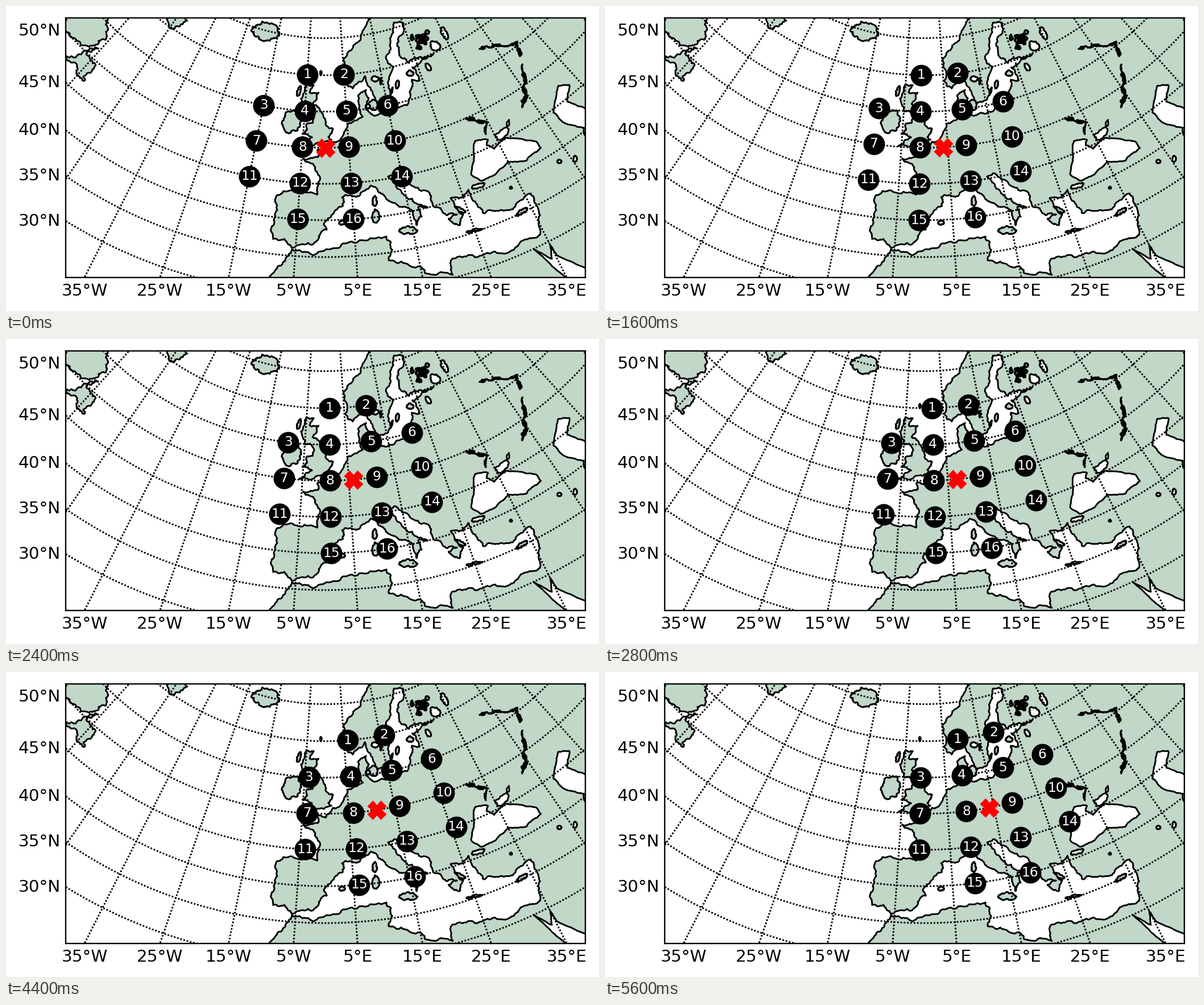
Animation, 1043 px wide and 537 px high, one loop 6 s. Source, as a matplotlib script:

```python
import numpy as np
import matplotlib.pyplot as plt
from matplotlib.animation import FuncAnimation

W, H, DPI = 1043, 537, 128
X0, X1, Y0, Y1 = 105.3, 1018.9, 21.1, 477.9
CX, CY = (X0 + X1) / 2, (Y0 + Y1) / 2
PX = 72 / DPI          # points per pixel
U = 2.917 * PX         # line unit
LAND = "#c1d7c8"
rng = np.random.default_rng(4)

# Lambert conformal conic, tangent at 50N, 8000 km wide
N = np.sin(np.radians(50))
RHO0 = (X1 - X0) / 8e6 * 6370997 / np.tan(np.radians(50))


def project(lon, lat):
    half = np.radians(45 + np.asarray(lat, float) / 2)
    rho = RHO0 * (np.tan(np.radians(70)) / np.tan(half)) ** N
    a = N * np.radians(lon)
    return CX + rho * np.sin(a), CY - RHO0 + rho * np.cos(a)


fig = plt.figure(figsize=(W / DPI, H / DPI), dpi=DPI, facecolor="white")
ax = fig.add_axes([X0 / W, 1 - Y1 / H, (X1 - X0) / W, (Y1 - Y0) / H])
ax.set(xlim=(X0, X1), ylim=(Y1, Y0), xticks=[], yticks=[])
for spine in ax.spines.values():
    spine.set_linewidth(0.8 * U)


def roughen(pts, amount, levels=4):
    """Fractal coast: push the midpoint of every side at random, repeatedly."""
    for _ in range(levels):
        step = np.roll(pts, -1, axis=0) - pts
        size = np.maximum(np.hypot(*step.T), 1e-6)
        push = rng.uniform(-amount, amount, len(pts)) * np.minimum(1, 18 / size)
        mid = pts + step / 2 + step[:, ::-1] * [1, -1] * push[:, None]
        pts = np.stack([pts, mid], axis=1).reshape(-1, 2)
    return pts


def draw(pts, color, amount):
    ax.fill(*roughen(pts, amount).T, fc=color, ec="black", lw=U,
            joinstyle="round", zorder=1)


def coast(points, color=LAND, amount=0.2):
    draw(np.column_stack(project(*np.transpose(points))), color, amount)


def blob(lon, lat, rx, ry, tilt=0, color=LAND, amount=0.25):
    """Rough ellipse with pixel radii, turned clockwise by tilt degrees."""
    a = np.linspace(0, 2 * np.pi, 10, endpoint=False)
    r = rng.uniform(0.88, 1.12, 10)
    z = r * (rx * np.cos(a) + 1j * ry * np.sin(a)) * np.exp(1j * np.radians(tilt))
    x, y = project(lon, lat)
    draw(np.column_stack([x + z.real, y + z.imag]), color, amount)


def river(points):
    coast(points + points[-2:0:-1], "black", 0.25)


# Mainland: key capes and bays
north = [(15.5, 68.3), (11, 64.6), (5.2, 62.1), (5.2, 59.2), (7, 58), (10.6, 59.5),
         (12.8, 55.5), (14.3, 55.6), (16.4, 56.4), (16.8, 58.5), (18.8, 60),
         (17.2, 61.3), (21.3, 64.5), (22.3, 65.7), (25.2, 65.2), (21.4, 62.8),
         (21.5, 60.8), (23, 59.9), (30.1, 59.9), (23.5, 59.2), (24.3, 57.2),
         (22.4, 57.6), (21, 56), (19.5, 54.4), (14.3, 53.9), (11, 54.1), (9.7, 55),
         (10.8, 56.4), (10.4, 57.6), (8.2, 56.9), (8.8, 54)]
west = [(5, 53.2), (3.6, 51.4), (1.6, 50.8), (0.1, 49.5), (-1.8, 49.6), (-1.6, 48.7),
        (-4.7, 48.4), (-2.1, 47.2), (-1.1, 45.6), (-1.6, 43.5), (-8, 43.7),
        (-9.2, 43), (-8.8, 41), (-9.4, 38.7), (-8.9, 37), (-7, 37.2), (-5.5, 36.1),
        (-2.1, 36.7), (0.2, 38.7), (-0.3, 39.5), (3.2, 41.9), (3.1, 43.1),
        (6.2, 43.1), (8.8, 44.4)]
south = [(10.4, 43.2), (12.3, 41.7), (15.6, 40), (15.8, 38), (17, 39), (16.8, 40.4),
         (18.4, 40), (16, 41.7), (13.7, 43.4), (12.3, 45.3), (13.7, 45.6), (14.4, 45),
         (19.4, 41.8), (19.4, 40.4), (21.3, 38.3), (23, 38), (21.4, 37.8),
         (22.9, 36.5), (24, 37.7), (23, 39.1), (22.8, 40.4), (24, 40.2), (26.3, 40.7)]
levant = [(26.3, 39.4), (27.3, 37), (30.5, 36.4), (32.6, 36.1), (36, 36.8),
          (35.9, 34.5), (34.3, 31.3)]
africa = [(31, 31.5), (29, 30.9), (23, 32.3), (20.3, 32.5), (19.6, 30.4),
          (15.5, 31.5), (15.2, 32.3), (10.2, 34), (11, 35.3), (10.4, 37.2), (3, 36.8),
          (-2, 35.2), (-5.6, 35.9), (-6.9, 34), (-9.8, 31.4), (-10.2, 29)]
outside = [(-11, 26), (20, 15), (60, 20), (75, 50), (60, 75), (30, 75)]
coast(north + west + south + levant + africa + outside)

# Inland seas: Black, Azov, Caspian, Red
coast([(29, 41.2), (27.8, 42.6), (29.7, 45), (31, 46.6), (33.4, 46), (32.7, 45.4),
       (33.7, 44.5), (36.8, 45.1), (41.4, 42.6), (41.5, 41.5), (38, 41), (35, 42),
       (31.4, 41.2)], "white", 0.1)
coast([(35, 45.4), (35, 46.2), (39, 47.1), (37.3, 45.4)], "white")
coast([(47.2, 44.6), (51.2, 47.1), (53, 46.2), (50.6, 44.6), (53.5, 41), (52, 38),
       (49.3, 39.5), (50, 40.4), (47.5, 43)], "white", 0.1)
coast([(32.5, 30), (34.2, 26.2), (36, 23), (40, 22), (35.2, 27.9), (35, 29.5),
       (34.3, 27.8)], "white", 0.05)

# Great Britain, Greenland tip, Labrador, Newfoundland
coast([(-5.7, 50.1), (1.3, 51.1), (0.6, 51.5), (1.7, 52.6), (0.3, 53), (-1.6, 55.5),
       (-3.2, 56), (-1.8, 57.6), (-4.1, 57.6), (-3.1, 58.6), (-5.1, 58.6), (-5.7, 56),
       (-4.9, 54.9), (-3.3, 54.9), (-3, 53.4), (-4.4, 53.2), (-4.2, 52.4),
       (-5.2, 51.8), (-3, 51.4)])
coast([(-50, 63), (-44.5, 59.9), (-42, 62)], amount=0.35)
coast([(-61, 57), (-57.3, 54.5), (-55.8, 53), (-56.8, 51.4), (-60, 50.2), (-66, 50),
       (-70, 58)], amount=0.3)
coast([(-55.5, 51.5), (-56.6, 49.8), (-53.3, 49), (-53.2, 46.8), (-55.8, 47.2),
       (-59.2, 47.7)], amount=0.35)

# Islands: Ireland, Iceland, Mediterranean, Baltic, Scottish
for island in [(-7.9, 53.4, 16, 21, 20), (-18.9, 64.9, 25, 16, 5),
               (9, 40.1, 6, 13), (9.1, 42.2, 4, 9), (14.2, 37.5, 15, 6),
               (24.9, 35.2, 15, 2, -12), (33.3, 35.1, 11, 4, -35), (2.9, 39.6, 5, 4),
               (23.8, 38.5, 11, 3, 30), (11.7, 55.4, 8, 9), (10.3, 55.3, 4, 4),
               (18.5, 57.5, 3, 7, 10), (16.7, 56.8, 1, 7, 15), (22.5, 58.5, 6, 5),
               (-6.8, 57.7, 3, 10, 15), (-1.3, 60.3, 1, 4)]:
    blob(*island)

# Lakes and reservoirs
for lake in [(31.4, 60.8, 9, 8), (35.4, 61.8, 5, 11, -30), (27.5, 58.5, 4, 7, -30),
             (13.2, 58.9, 6, 5), (14.5, 58.4, 1, 6), (28.2, 40.7, 12, 4, -20),
             (43, 38.6, 4, 3), (45.5, 37.7, 3, 6), (33.4, 38.7, 2, 2)]:
    blob(*lake, color="white")
for _ in range(22):
    blob(*rng.normal([28.2, 62.1], [1.2, 0.65]), *rng.uniform(1, 4, 2),
         rng.uniform(0, 90), color="white", amount=0.5)
river([(41.5, 57.6), (47, 56), (50.3, 55.4), (48.6, 53.6)])
river([(48, 52.5), (45.3, 50), (44.8, 48.8), (42.6, 47.6)])
river([(31, 50), (34.8, 48.3), (33.5, 46.8)])


def dotted(lon, lat):
    """Graticule line; the dots start just outside the map."""
    x, y = project(lon, lat)
    dx, dy = (X1 - X0) / 100, (Y1 - Y0) / 100
    seen = (abs(x - CX) <= 51 * dx) & (abs(y - CY) <= 51 * dy)
    cuts = np.flatnonzero(np.diff(seen.astype(int))) + 1
    for px, py, on in zip(*(np.split(v, cuts) for v in (x, y, seen))):
        if on[0]:
            ax.plot(px, py, color="black", lw=U, ls=(0, (1, 1)),
                    dash_capstyle="butt", zorder=2)


label = dict(fontsize=10.1 * U, family="DejaVu Sans", clip_on=False)
for lat in range(30, 70, 5):
    dotted(np.arange(-90, 90, 0.02), lat)
    if lat <= 50:
        rho = project(0, lat)[1] - CY + RHO0
        y = CY - RHO0 + np.sqrt(rho ** 2 - (CX - X0) ** 2)
        ax.text(X0 - 9.1, y, f"{lat}°N", ha="right", va="center", **label)
for lon in range(-75, 80, 10):
    dotted(lon, np.arange(10, 80, 0.02))
    if abs(lon) <= 35:
        x = CX + (Y1 - CY + RHO0) * np.tan(N * np.radians(lon))
        ax.text(x, 509.7, f"{abs(lon)}°{'W' if lon < 0 else 'E'}",
                ha="center", va="baseline", **label)

# Numbered grid around the red cross, moving one degree east per step
rows = {60: (-5, 5), 55: (-15, -5, 5, 15), 50: (-15, -5, 5, 15),
        45: (-15, -5, 5, 15), 40: (-5, 5)}
grid = np.array([(lon, lat) for lat, lons in rows.items() for lon in lons])
discs, = ax.plot([], [], "o", color="black", ms=12 * U, mew=U, zorder=5)
cross, = ax.plot([], [], "X", color="red", ms=10 * U, mew=U, zorder=5)
numbers = [ax.text(0, 0, str(k + 1), color="white", fontsize=8 * U, ha="center",
                   va="center", family="DejaVu Sans", zorder=6)
           for k in range(len(grid))]


def update(i):
    xs, ys = project(grid[:, 0] + i, grid[:, 1])
    discs.set_data(xs, ys)
    for text, x, y in zip(numbers, xs, ys):
        text.set_position((x, y))
    x, y = project(i, 50)
    cross.set_data([x], [y])
    return [discs, cross, *numbers]


anim = FuncAnimation(fig, update, frames=15, interval=400, repeat=True, repeat_delay=0)
plt.show()
```
